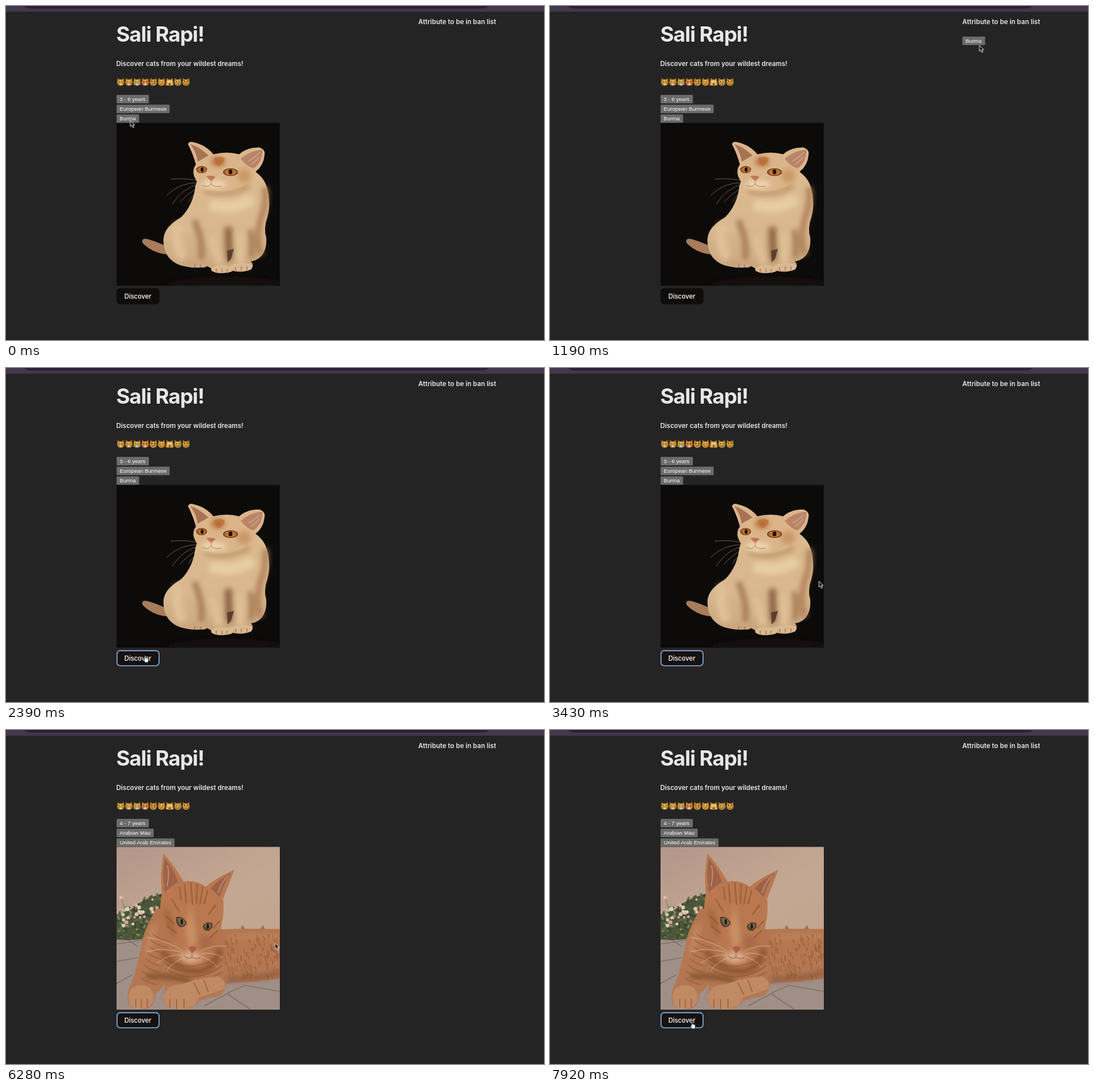
Animation of 949 by 590 pixels, one loop 8 s. Source, as an HTML page:

```html
<!DOCTYPE html>
<html lang="en">
<head>
<meta charset="utf-8">
<title>Discover cats</title>
<style>
  html, body { margin: 0; width: 100%; height: 100%; overflow: hidden; background: #242424; }
  svg { display: block; }
  text { fill: #fff; }
  .ui { font-family: Inter, "Open Sans", sans-serif; font-size: 11.52px; font-weight: 600; fill: #e8e8e8; }
  .title { font-size: 36.9px; font-weight: 700; letter-spacing: -1.05px; }
  .side { letter-spacing: .06px; }
  .press { font-weight: 500; letter-spacing: -.1px; fill: #fff; }
  .tag rect { fill: #6b6b6b; }
  .tag text { font: 9.6px "Liberation Sans", Arial, sans-serif; }

  .timed, #pointer { animation: 8s step-end infinite; }
  .old { animation-name: old; }
  .new { animation-name: new; }
  #ban { animation-name: ban; }
  #ginger { animation-name: ginger; }
  #ring { animation-name: ring; }
  #arrow { animation-name: arrow; }
  #hand { animation-name: hand; }
  #pointer { animation-name: move; }

  @keyframes old { 0% { visibility: visible } 71%, to { visibility: hidden } }
  @keyframes new { 0% { visibility: hidden } 71%, to { visibility: visible } }
  @keyframes ban { 0% { visibility: hidden } 9.375% { visibility: visible } 18.625%, to { visibility: hidden } }
  @keyframes ginger { 0% { visibility: hidden } 78.5%, to { visibility: visible } }
  @keyframes ring { 0% { opacity: 0 } 28% { opacity: .6 } 29.875%, to { opacity: 1 } }
  @keyframes arrow {
    0% { visibility: visible } 26.125% { visibility: hidden }
    39.25% { visibility: visible } 99%, to { visibility: hidden }
  }
  @keyframes hand {
    0% { visibility: hidden } 26.125% { visibility: visible }
    39.25% { visibility: hidden } 99%, to { visibility: visible }
  }
  @keyframes move {
    0% { transform: translate(219.5px, 202.5px) }
    13.125% { transform: translate(520px, 126px) }
    14.875% { transform: translate(757.5px, 69.5px) }
    16.75% { transform: translate(752px, 62px) }
    18.625% { transform: translate(750px, 63px) }
    20.5% { transform: translate(620px, 210px) }
    22.375% { transform: translate(400px, 420px) }
    24.25% { transform: translate(277.5px, 504px) }
    26.125% { transform: translate(242px, 507px) }
    39.25% { transform: translate(330px, 450px) }
    41.125% { transform: translate(462px, 369px) }
    42.875% { transform: translate(474.5px, 376.5px) }
    82.25% { transform: translate(432px, 342px) }
    84.125% { transform: translate(335px, 260px) }
    86% { transform: translate(262px, 201px) }
    87.875% { transform: translate(228px, 182px) }
    89.625% { transform: translate(210px, 178px) }
    91.5% { transform: translate(206px, 184px) }
    93.375% { transform: translate(215px, 218px) }
    95.25% { transform: translate(233px, 317px) }
    97.125% { transform: translate(244px, 430px) }
    99%, to { transform: translate(247px, 514.5px) }
  }
</style>
</head>
<body>
<svg width="949" height="590" xmlns="http://www.w3.org/2000/svg">
  <defs>
    <clipPath id="photo"><rect x="195" y="206.5" width="288" height="287.5"/></clipPath>
    <filter id="soft" x="-40%" y="-40%" width="180%" height="180%"><feGaussianBlur stdDeviation="5"/></filter>
    <filter id="edge"><feGaussianBlur stdDeviation=".7"/></filter>
    <linearGradient id="cream" x1="0" y1="0" x2="0" y2="1">
      <stop offset="0" stop-color="#dcb98f"/><stop offset=".55" stop-color="#d9b88f"/><stop offset="1" stop-color="#c8a47c"/>
    </linearGradient>
    <linearGradient id="wall" x1="0" y1="0" x2=".6" y2="1">
      <stop offset="0" stop-color="#b3968a"/><stop offset=".5" stop-color="#c4a792"/><stop offset="1" stop-color="#c2a38e"/>
    </linearGradient>
    <linearGradient id="orange" x1="0" y1="0" x2="0" y2="1">
      <stop offset="0" stop-color="#b5744c"/><stop offset="1" stop-color="#b27a56"/>
    </linearGradient>
    <path id="bodyA" d="M334 318C332 338 324 358 309 373C288 386 276 398 278 419C280 440 291 455 316 460Q337 465 354 459L361 463Q377 477 400 468Q418 472 433 465Q438 457 432 451C449 449 461 434 459 409Q454 393 461 373Q468 348 460 320Q455 302 436 290L340 300Z"/>
    <path id="bodyB" d="M264 316C254 338 240 360 239 382L224 440Q210 467 216 485Q224 495 246 493Q262 490 264 466L280 450L277 476Q281 492 303 495Q330 496 342 478L378 469Q391 455 388 446Q440 447 490 437V352Q440 350 380 352L371 310Z"/>
    <path id="headB" d="M275 288C272 262 274 239 278 218Q298 240 313 268Q334 263 352 277Q374 259 403 247Q394 269 383 298C385 325 382 347 373 363Q366 392 345 409Q327 421 310 404Q297 386 285 361Q266 334 275 288Z"/>
    <g id="face">
      <path d="M-6 0L-5.4-7.2L-1.5-4.5H1.5L5.4-7.2L6 0Z" fill="#b87c28"/>
      <ellipse cy=".8" rx="6.3" ry="5.7" fill="#cf9532"/>
      <ellipse cy="-.8" rx="4.2" ry="2.5" fill="#dcae48"/>
      <path d="M-7 1.4L-4 2M-7 3.8L-4 3.2M7 1.4L4 2M7 3.8L4 3.2" stroke="#6d4b20" stroke-width=".6"/>
      <path d="M-.8 1.2H.8L0 2Z" fill="#844"/>
    </g>
  </defs>

  <rect width="949" height="590" fill="#242424"/>
  <rect width="949" height="9" fill="#43374c"/>
  <rect y="9" width="949" height=".8" fill="#4a4150"/>
  <path d="M31 0Q37 4.5 45 4.5H838Q847 4.5 851 0Z" fill="#2c2133"/>

  <text class="ui title" x="194.5" y="62.5">Sali Rapi!</text>
  <text class="ui" x="194.5" y="106.3">Discover cats from your wildest dreams!</text>
  <text class="ui side" x="727.3" y="31.6">Attribute to be in ban list</text>
  <g id="emoji"></g>
  <g id="tags"></g>

  <g clip-path="url(#photo)">
    <rect x="195" y="206" width="288" height="288" fill="#0d0b0a"/>
    <path d="M275 490Q370 468 483 486V494H275Z" fill="#17110e" filter="url(#soft)"/>
    <g filter="url(#edge)">
      <path d="M286 426Q264 415 246 411Q237 412 242 420Q261 438 287 439Z" fill="#a97c5a"/>
      <use href="#bodyA" fill="url(#cream)"/>
      <g filter="url(#soft)" fill="none">
        <path d="M306 386Q294 409 312 447" stroke="#dfc198" stroke-width="17"/>
        <path d="M332 378Q349 415 344 448" stroke="#a57a54" stroke-width="10"/>
        <path d="M457 320Q460 350 449 377Q440 410 449 440" stroke="#ad7f58" stroke-width="10"/>
        <path d="M350 327Q390 340 430 318" stroke="#b98b60" stroke-width="6"/>
        <path d="M360 350Q398 364 435 340" stroke="#e8cda2" stroke-width="20"/>
        <path d="M392 390L394 449" stroke="#8f6544" stroke-width="13"/>
        <path d="M430 395Q436 422 432 445" stroke="#a0744f" stroke-width="8"/>
        <path d="M362 405L377 455M414 400L413 455" stroke="#dfbf95" stroke-width="15"/>
      </g>
      <path d="M390 432L391 453L397 446L402 429Z" fill="#58402c"/>
      <path d="M362 463Q376 453 397 461Q405 470 389 471Q370 474 362 467ZM394 459Q415 450 433 457Q437 465 425 467Q407 470 395 463Z" fill="#d9b88f"/>
      <path d="M320 455Q335 446 354 456Q358 462 344 462Q327 464 320 455Z" fill="#c9a47e"/>
      <path d="M371 464V470M381 464V471M390 464V470M405 461V467M415 460V467M425 460V466M333 456V462M343 457V462" stroke="#7f5a3c"/>

      <path d="M335 280Q329 259 321 244Q323 238 332 241Q352 245 366 262Q390 256 411 262Q426 249 447 250Q458 253 456 264Q454 282 441 292Q434 311 413 320Q385 331 360 325Q341 321 335 307Q326 292 335 280Z" fill="#dbb58a"/>
      <path d="M325 244Q340 248 357 264L338 275Q336 258 325 244Z" fill="#a87354"/>
      <path d="M414 270Q431 255 452 254Q453 276 436 287Q424 283 414 270Z" fill="#b98568"/>
      <path d="M428 274Q440 267 448 258M433 280Q442 272 448 266" stroke="#e2c4a4" stroke-width="1.4" fill="none" opacity=".6"/>
      <g filter="url(#soft)">
        <ellipse cx="374" cy="275" rx="12" ry="8" fill="#b86d36"/>
        <ellipse cx="420" cy="300" rx="12" ry="12" fill="#cb9767"/>
        <ellipse cx="367" cy="315" rx="22" ry="7" fill="#efd8b3"/>
      </g>
      <path d="M367 269Q378 264 386 269Q383 281 374 283Q370 277 367 269Z" fill="#b66b36" opacity=".65"/>
      <ellipse cx="345" cy="289" rx="9.5" ry="6.3" fill="#57341f"/>
      <ellipse cx="345" cy="289" rx="8" ry="5.3" fill="#bd6c2a"/>
      <ellipse cx="346" cy="289" rx="2.6" ry="4" fill="#1d120c"/>
      <ellipse cx="396" cy="293.5" rx="13" ry="6.8" fill="#57341f"/>
      <ellipse cx="396" cy="293.5" rx="11" ry="5.6" fill="#c4712c"/>
      <ellipse cx="396" cy="293" rx="3.3" ry="4.3" fill="#1d120c"/>
      <path d="M353 301Q362 298 370 302L362 309Z" fill="#bc7a58"/>
      <path d="M362 309V315M347 317Q356 321 362 315Q370 321 380 318" stroke="#875c3e" fill="none" opacity=".7"/>
    </g>
    <path d="M344 309Q312 303 291 306M342 312Q307 311 284 334M342 314Q312 321 293 350M346 317Q318 332 307 347M349 319Q328 334 322 346M390 313Q419 325 429 339M387 316Q410 330 417 344" stroke="#d9bd98" stroke-width=".7" opacity=".65" fill="none"/>
  </g>

  <g id="ginger" class="timed" clip-path="url(#photo)">
    <rect x="195" y="206" width="288" height="288" fill="url(#wall)"/>
    <path d="M195 370H290L380 352H483V494H195Z" fill="#a08f87"/>
    <path d="M195 378L243 371M195 409L232 402M215 371L232 382M195 448L222 433M390 465L421 451M421 451L483 462M387 447L483 438M350 487L390 466L432 494" stroke="#7d716b" stroke-width="1.6" fill="none"/>
    <g id="bush"></g>
    <path d="M413 354L417 344L423 354M447 354L453 344L458 355" fill="#927364"/>
    <g filter="url(#edge)">
      <use href="#bodyB" fill="url(#orange)"/>
      <g filter="url(#soft)" fill="none">
        <path d="M262 345Q252 372 250 398" stroke="#c38a60" stroke-width="9"/>
        <path d="M276 390Q297 426 342 427Q369 421 378 385" stroke="#8d5433" stroke-width="11"/>
        <path d="M248 436Q277 432 327 442" stroke="#82502f" stroke-width="9"/>
        <path d="M389 440Q430 440 483 431" stroke="#87553a" stroke-width="7"/>
        <path d="M392 368Q430 362 483 366" stroke="#bd835b" stroke-width="9"/>
      </g>
      <g id="fur" stroke="#8c5331" fill="none" opacity=".5"></g>
      <path d="M216 471Q218 450 241 451Q262 453 260 477Q256 492 237 493Q216 495 216 471ZM278 470Q284 449 311 449Q330 440 374 435Q390 444 385 458L341 472Q333 495 306 494Q277 494 278 470Z" fill="#bf8a64"/>
      <path d="M229 475V490M239 476V492M249 475V490M289 475V490M301 476V493M314 475V491M331 446L342 468M349 441L357 463" stroke="#84502f" stroke-width="1.5" opacity=".75"/>
      <use href="#headB" fill="#b9784f"/>
      <path d="M280 226Q293 242 304 268Q292 276 280 286Q275 252 280 226ZM397 252Q376 263 361 280L377 295Q385 268 397 252Z" fill="#9d634a"/>
      <path d="M284 276Q289 252 285 239M374 289Q380 269 391 258" stroke="#c9a084" stroke-width="2" fill="none" opacity=".7"/>
      <g filter="url(#soft)">
        <path d="M326 303L337 369L324 391L317 358Z" fill="#cb9067"/>
        <ellipse cx="327" cy="401" rx="19" ry="10" fill="#d9ae8c"/>
        <path d="M278 309Q279 347 300 372L293 331Z" fill="#9f643e"/>
        <path d="M338 358Q358 372 372 356L362 385L343 387Z" fill="#a96c46"/>
      </g>
      <path d="M315 273L318 306M326 269L329 309M337 271L336 307M347 276L342 307M306 277L309 301M356 283L349 307M292 298L306 322M370 309L357 326M281 327L297 343M284 346L301 359M377 337L365 350M374 354L359 368" stroke="#8d5330" stroke-width="2.3" opacity=".65"/>
      <path d="M300 331Q309 326 319 340Q316 350 306 348Q299 342 300 331ZM347 347Q353 336 364 341Q366 349 358 355Q349 356 347 347Z" fill="#53402f"/>
      <path d="M302 333Q310 330 317 340Q314 347 307 346ZM349 347Q355 339 362 343Q362 349 357 353Z" fill="#79664a"/>
      <ellipse cx="310" cy="339" rx="2.2" ry="5" fill="#241d17"/>
      <ellipse cx="356" cy="347" rx="2.2" ry="4.5" fill="#241d17"/>
      <path d="M321 384Q329 379 337 386L328 395Z" fill="#a9624c"/>
      <path d="M328 395V401M314 399Q322 406 328 401Q337 407 344 400" stroke="#8a5136" stroke-width="1.2" fill="none" opacity=".8"/>
    </g>
    <path d="M313 390Q276 369 247 366M312 393Q275 383 249 392M313 397Q286 395 266 412M316 401Q292 411 283 426M343 391Q367 378 388 382M344 395Q367 392 382 402M342 400Q361 404 372 419" stroke="#ead6c0" stroke-width=".8" opacity=".75" fill="none"/>
  </g>

  <rect x="195" y="498.7" width="75.7" height="28" rx="5.8" fill="#0f0d0c"/>
  <rect id="ring" class="timed" x="195.8" y="499.4" width="74.1" height="26.6" rx="5.4" fill="#171110" stroke="#8dbdf2" stroke-width="1.6"/>
  <text class="ui press" x="208.7" y="517.2">Discover</text>

  <g id="pointer">
    <path id="arrow" class="timed" d="M0 0V10.6L2.5 8.3L4.4 12.5L6.2 11.7L4.3 7.6H7.6Z" fill="#111" stroke="#f2f2f2" stroke-width="1" stroke-linejoin="round"/>
    <path id="hand" class="timed" d="M2.6 8.3V1.6Q3.4 .2 4.3 1.6V5.2Q5.4 4.5 6 5.5Q7.1 4.9 7.7 6Q9.2 5.7 9.3 7.1V9.7Q9.2 11.5 8.2 13.3H3.7Q2.9 11.5 .8 9.2Q.2 7.6 1.6 7.7Z" fill="#f7f7f7" stroke="#161616" stroke-width=".8" stroke-linejoin="round"/>
  </g>
</svg>
<script>
  const put = (id, html) => { document.getElementById(id).innerHTML += html; };

  const tag = (x, y, w, label, attrs) =>
    `<g class="tag ${attrs}><rect x="${x}" y="${y}" width="${w}" height="15" rx="1.6"/>` +
    `<text x="${x + 5.6}" y="${y + 10.9}">${label}</text></g>`;
  const column = (cls, rows) => rows.map(([label, w], i) =>
    tag(195, 156.9 + i * 17.25, w, label, `timed ${cls}"`)).join("");
  put("tags",
    column("old", [["3 - 6 years", 57], ["European Burmese", 93.7], ["Burma", 39.8]]) +
    column("new", [["4 - 7 years", 57], ["Arabian Mau", 65.6], ["United Arab Emirates", 102.3]]) +
    tag(727.3, 54, 40.2, "Burma", 'timed" id="ban"'));

  // small cat faces
  const line = (d, c = "#5b3a17", w = 1) => `<path d="${d}" fill="none" stroke="${c}" stroke-width="${w}"/>`;
  const dot = (x, y, r, c) => `<circle cx="${x}" cy="${y}" r="${r}" fill="${c}"/>`;
  const pair = (r, c) => dot(-2.5, -.6, r, c) + dot(2.5, -.6, r, c);
  const heart = x => `<path transform="translate(${x} -1)" d="M0 2.5L-2.2 0Q-2-2 0-.8Q2-2 2.2 0Z" fill="#dc3139"/>`;
  const eyes = pair(1, "#4d3317");
  const happy = line("M-4 0Q-2.6-2-1.3 0M1.3 0Q2.6-2 4 0");
  const grin = '<path d="M-3.3 2.4H3.3Q2.6 5.4 0 5.4Q-2.6 5.4-3.3 2.4Z" fill="#fff3dc" stroke="#70401c" stroke-width=".6"/>';
  const frown = line("M-2.5 4.7Q0 2.2 2.5 4.7");
  const tear = x => `<path d="M${x} .2Q${x - 2} 4.8 ${x} 5.2Q${x + 2} 4.8 ${x} .2Z" fill="#45aee8"/>`;
  const palms = dot(-4.6, 4, 2.1, "#e8bb4b") + dot(4.6, 4, 2.1, "#e8bb4b");
  const moods = [
    eyes + grin, happy + grin, happy + grin + tear(-5) + tear(5), heart(-2.7) + heart(2.7) + grin,
    eyes + line("M-2.5 3.5Q1 5 3-.2") + line("M-4-2.3L-1-1.4M1-1.4L4-2.3"),
    happy + dot(0, 3.8, 1.1, "#a34a32") + dot(-4, 2.6, 1, "#e28345") + dot(4, 2.6, 1, "#e28345"),
    pair(1.7, "#fff3dc") + pair(.6, "#4d3317") + dot(0, 4, 1.3, "#63391c") + palms,
    eyes + frown + tear(3), eyes + frown + line("M-4.2-3L-1.3-1.7M4.2-3L1.3-1.7")
  ];
  put("emoji", moods.map((mood, i) =>
    `<g transform="translate(${202.3 + i * 14.4} 134.4)"><use href="#face"/>${mood}</g>`).join(""));

  let seed = 17;
  const rnd = () => (seed = seed * 16807 % 2147483647) / 2147483647;
  const pick = list => list[Math.floor(rnd() * list.length)];

  // leaves and blossoms below a slanted upper edge
  const crown = x => 322 - (x - 195) * .5;
  let bush = '<path d="M195 326Q216 322 230 310Q250 294 276 290V337L256 367Q223 373 195 370Z" fill="#4b5538"/>';
  for (let i = 0; i < 120; i++) {
    const x = 196 + rnd() * 78, y = crown(x) + rnd() * (367 - crown(x));
    bush += `<ellipse rx="4.2" ry="1.9" transform="translate(${x} ${y}) rotate(${rnd() * 180})" fill="${pick(["#3b4730", "#5c6a44", "#7a835b", "#505d3b"])}"/>`;
  }
  for (let i = 0; i < 24; i++) {
    const x = 200 + rnd() * 72;
    bush += dot(x, crown(x) + rnd() * 36, 2 + rnd() * 1.8, pick(["#d3a09f", "#dfc0b4", "#dccdbd"]));
  }
  put("bush", bush + dot(203, 296, 3, "#dcc0b2") + line("M203 298Q209 307 208 324", "#6d7350"));

  let fur = "";
  for (let i = 0; i < 110; i++) {
    const x = 384 + rnd() * 97, y = 359 + rnd() * 74;
    fur += `<path d="M${x} ${y}q${1 + rnd() * 4} 4 ${rnd() * 3} ${5 + rnd() * 6}" stroke-width="${1 + rnd() * 1.5}"/>`;
  }
  for (let i = 0; i < 8; i++) fur += `<path d="M${258 - i * 3} ${360 + i * 11}q12 10 29 13" stroke-width="2.2"/>`;
  for (let i = 0; i < 4; i++) fur += `<path d="M${276 + i * 3} ${402 + i * 10}Q330 ${436 + i * 8} 382 ${394 + i * 11}" stroke-width="2.4"/>`;
  put("fur", fur);
</script>
</body>
</html>
```
